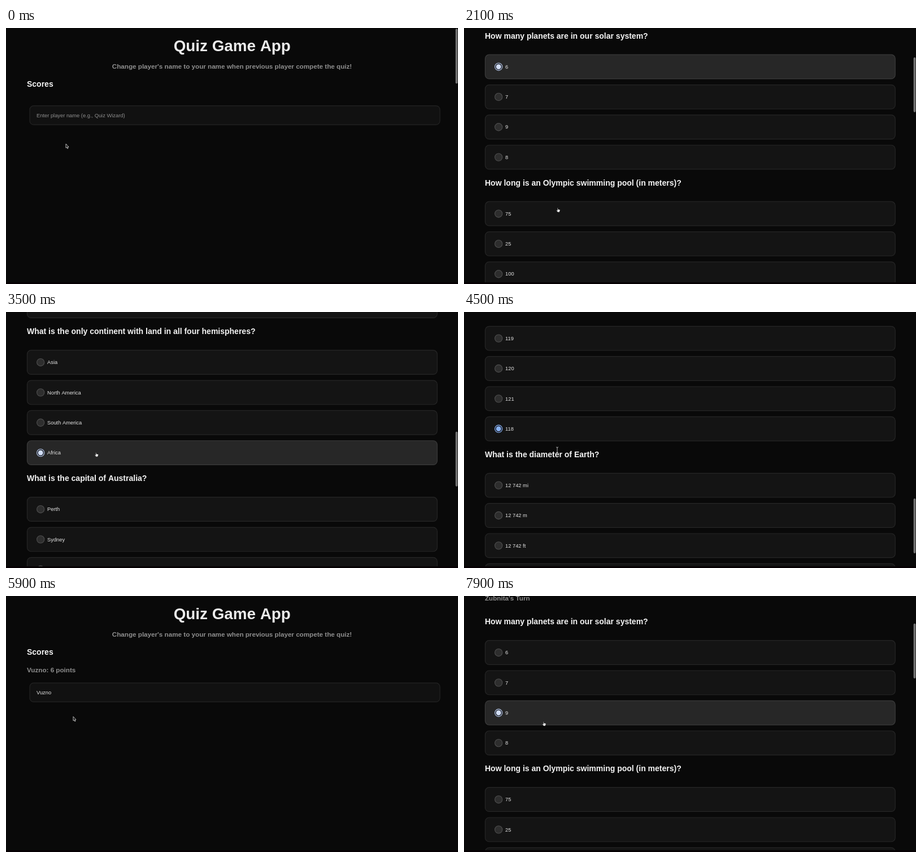
An HTML page with a canvas that plays this animation: 800 px wide and 453 px high, repeating every 8000 ms.

```html
<!DOCTYPE html>
<html lang="en">
<head>
<meta charset="utf-8">
<title>Quiz Game App</title>
<style>
html, body { margin: 0; width: 100%; height: 100%; overflow: hidden; background: #090909; }
canvas { display: block; width: 800px; height: 453px; }
</style>
</head>
<body>
<canvas id="stage"></canvas>
<script>
const W = 800, H = 453, LOOP = 8000, STEP = 100;
const canvas = document.getElementById('stage');
const dpr = window.devicePixelRatio || 1;
canvas.width = W * dpr;
canvas.height = H * dpr;
const ctx = canvas.getContext('2d');

const FONT = '"Liberation Sans", Arial, sans-serif';
const BODY = 9.333, SUB = 11.667, HEAD = 14, TITLE = 27.8;
const BLUE = '#8ab4f8', GREY = '#8e8e8e';
const FIRST = 'Vuzno', SECOND = 'Zubnita';

// page layout
const QUIZ_TOP = 255, BLOCK = 260, FIRST_BOX = 32.9, PITCH = 53.35, BOX = 43.7;
const FIELD_TOP = 137.7, FIELD_H = 33.5, SCORE_LINE = 16.2;
const SUBMIT_TOP = 250.5, SUBMIT_H = 28, MAX_SCROLL = 1677.5;

// moments in ms
const FOCUS = 300, TYPE = 600, START = 1100, SUBMITTED = 5400;
const REFOCUS = 6000, RETYPE = 6500, RESTART = 7200, REPICK = 7800;

const quiz = [
  { title: 'How many planets are in our solar system?', options: ['6', '7', '9', '8'], pick: 0 },
  { title: 'How long is an Olympic swimming pool (in meters)?', options: ['75', '25', '100', '50'], pick: 3 },
  { title: 'What geometric shape is generally used for stop signs?', options: ['Hexagon', 'Triangle', 'Octagon', 'Pentagon'], pick: 2 },
  { title: 'What is the only continent with land in all four hemispheres?', options: ['Asia', 'North America', 'South America', 'Africa'], pick: 3 },
  { title: 'What is the capital of Australia?', options: ['Perth', 'Sydney', 'Melbourne', 'Canberra'], pick: 3 },
  { title: 'How many elements are in the periodic table?', options: ['119', '120', '121', '118'], pick: 3 },
  { title: 'What is the diameter of Earth?', options: ['12 742 mi', '12 742 m', '12 742 ft', '12 742 km'], pick: 3 }
];

const clamp = (v, lo = 0, hi = 1) => Math.min(hi, Math.max(lo, v));
const between = (t, a, b) => t >= a && t < b;
const easeOut = u => 1 - (1 - clamp(u)) ** 2;
const typed = (name, t, start, perChar) =>
  name.slice(0, Math.max(0, Math.floor((t - start) / perChar) + 1));

const secondRound = t => t >= SUBMITTED;
const shiftAt = t => secondRound(t) ? SCORE_LINE : 0;
const quizShown = t => between(t, START, SUBMITTED) || t >= RESTART;

// Each answer is scrolled towards a spot that creeps up the window.
const clickTime = k => 1900 + 500 * k;
const answerY = k => QUIZ_TOP + k * BLOCK + FIRST_BOX + BOX / 2 + quiz[k].pick * PITCH;
const aim = k => 309.7 - 19.6 * k - 0.2 * k * k;
const rest = k => clamp(answerY(k) - aim(k), 0, MAX_SCROLL);

function scrollAt(t) {
  if (secondRound(t)) return 250 * easeOut((t - 7300) / 870);
  let y = rest(0);
  for (let k = 1; k < quiz.length; k++) {
    y += (rest(k) - rest(k - 1)) * easeOut((t - clickTime(k - 1) - 100) / 305);
  }
  return y;
}

// time, x, y
const route = [
  [0, 108, 209], [300, 119, 154], [1000, 119, 154], [1300, 167, 322], [2100, 167, 322],
  [3400, 160, 253], [4500, 165, 244], [5000, 229, 403], [5500, 229, 403],
  [6000, 94, 171], [6400, 34, 170], [6900, 34, 170], [7100, 144, 240], [7900, 142, 226]
];

function mouseAt(t) {
  const i = route.findIndex(p => p[0] > t);
  if (i < 0) return route[route.length - 1].slice(1);
  const [a, b] = [route[i - 1], route[i]];
  const u = (t - a[0]) / (b[0] - a[0]);
  return [1, 2].map(c => a[c] + (b[c] - a[c]) * u);
}

function pointerShape(t, y) {
  if (between(t, TYPE, START) || between(t, RETYPE, 7000)) return 'none';
  const pageY = y + scrollAt(t) - shiftAt(t);
  if (between(pageY, FIELD_TOP, FIELD_TOP + FIELD_H)) return 'beam';
  const local = pageY - QUIZ_TOP;
  if (!quizShown(t) || local < -10) return 'arrow';
  const q = Math.min(quiz.length - 1, Math.floor((local + 10) / BLOCK));
  const inner = local - q * BLOCK;
  if (inner < 10) return 'beam';
  if (between(inner, SUBMIT_TOP, SUBMIT_TOP + SUBMIT_H)) return 'hand';
  const row = (inner - FIRST_BOX) / PITCH;
  return between(row, 0, 4) && row % 1 < BOX / PITCH ? 'hand' : 'arrow';
}

function optionState(t, q, o) {
  const again = secondRound(t);
  if (again ? q !== 0 || o !== 2 : o !== quiz[q].pick) return {};
  const click = again ? REPICK : clickTime(q);
  const spot = again ? 228 : answerY(q) - rest(q);
  const near = Math.abs(mouseAt(t)[1] - spot) < BOX / 2;
  return { checked: t >= click, hover: near && Math.abs(t - click) < 250 };
}

// y is the middle of the capitals
function text(str, x, y, size, color, bold = true, align = 'left') {
  ctx.font = `${bold ? 'bold ' : ''}${size}px ${FONT}`;
  ctx.fillStyle = color;
  ctx.textAlign = align;
  ctx.fillText(str, x, y + size * 0.34);
}

function paint(fill, stroke, line) {
  if (fill) {
    ctx.fillStyle = fill;
    ctx.fill();
  }
  if (stroke) {
    ctx.strokeStyle = stroke;
    ctx.lineWidth = line;
    ctx.stroke();
  }
}

function box(x, y, w, h, r, fill, stroke) {
  ctx.beginPath();
  ctx.roundRect(x, y, w, h, r);
  paint(fill, stroke, 1.17);
}

function disc(x, y, r, fill, stroke) {
  ctx.beginPath();
  ctx.arc(x, y, r, 0, Math.PI * 2);
  paint(fill, stroke, 1.1);
}

function option(label, top, { hover, checked }) {
  const mid = top + BOX / 2;
  box(37.5, top + 0.5, 725.7, BOX - 1, 7, hover ? '#272727' : '#141414', hover ? '#3b3b3b' : '#262626');
  if (checked) {
    disc(61.2, mid, 6.6, hover ? '#2b2f38' : '#1b1f28', hover ? '#b4c5e6' : BLUE);
    disc(61.2, mid, 4.4, hover ? '#d2def8' : BLUE);
  } else {
    disc(61.2, mid, 6.6, '#2e2e2e', '#4e4e4e');
  }
  text(label, 73, mid, BODY, '#e4e4e4', false);
}

function questions(t) {
  const start = QUIZ_TOP + shiftAt(t);
  text(`${secondRound(t) ? SECOND : FIRST}'s Turn`, 37, start - 41, SUB, GREY);
  quiz.forEach(({ title, options }, q) => {
    const y = start + q * BLOCK;
    text(title, 37, y, HEAD, '#f4f4f4');
    options.forEach((label, o) =>
      option(label, y + FIRST_BOX + o * PITCH, optionState(t, q, o)));
  });
  const y = start + (quiz.length - 1) * BLOCK + SUBMIT_TOP;
  box(37, y, 726.7, SUBMIT_H, 4.6, '#5858ec');
  text('Submit', 400, y + SUBMIT_H / 2, BODY, '#f3f3ff', true, 'center');
}

function nameField(t) {
  const top = FIELD_TOP + shiftAt(t), mid = top + FIELD_H / 2;
  box(42, top, 726, FIELD_H, 7, '#111111', '#232323');
  if (between(t, FOCUS, clickTime(0)) || between(t, REFOCUS, REPICK)) {
    box(41.6, top - 0.4, 726.8, FIELD_H + 0.8, 7.4, null, BLUE);
  }
  const value = t < RETYPE ? typed(FIRST, t, TYPE, 80) : typed(SECOND, t, RETYPE, 50);
  if (!value) return text('Enter player name (e.g., Quiz Wizard)', 54, mid, BODY, GREY, false);
  if (between(t, REFOCUS, RETYPE)) {
    ctx.font = `${BODY}px ${FONT}`;
    const end = 54 + ctx.measureText(value).width;
    const from = clamp(mouseAt(t)[0], 54, end);
    ctx.fillStyle = '#315a92';
    ctx.fillRect(from, mid - 5.5, end - from, 11);
  }
  text(value, 54, mid, BODY, '#e4e4e4', false);
}

const pointers = {
  arrow: ['M-2-4V3.2L-.5 1.9 .8 4.5 1.9 4 .8 1.5H3Z', '#080808', '#cfcfcf', 0.9],
  beam: ['M-2-5Q0-5 0-3.5Q0-5 2-5M0-4V4M-2 5Q0 5 0 3.5Q0 5 2 5', null, '#a8a8a8', 1],
  hand: ['M-1.8-4H-.8L-.5-1.2 2.4-.7 3.2.2 2 4H-1.2L-3.6.8-3 .1-1.8 1Z', '#eeeeee', '#050505', 0.6]
};

function pointer(t) {
  const [x, y] = mouseAt(t);
  const look = pointers[pointerShape(t, y)];
  if (!look) return;
  const [d, fill, stroke, line] = look;
  const path = new Path2D(d);
  ctx.save();
  ctx.translate(x, y);
  if (fill) {
    ctx.fillStyle = fill;
    ctx.fill(path);
  }
  ctx.strokeStyle = stroke;
  ctx.lineWidth = line;
  ctx.stroke(path);
  ctx.restore();
}

function scrollbar(t, scroll) {
  const alpha = secondRound(t) ? 1 : clamp((4950 - t) / 150);
  if (!scroll || !alpha) return;
  ctx.globalAlpha = alpha;
  box(795.6, 1.3 + scroll * 0.2103, 3.8, 97, 1.9, '#737373');
  ctx.globalAlpha = 1;
}

function draw(t) {
  const scroll = scrollAt(t);
  ctx.setTransform(dpr, 0, 0, dpr, 0, 0);
  ctx.fillStyle = '#090909';
  ctx.fillRect(0, 0, W, H);

  ctx.save();
  ctx.translate(0, -scroll);
  text('Quiz Game App', 400.2, 31.7, TITLE, '#ebebeb', true, 'center');
  text("Change player's name to your name when previous player compete the quiz!",
    400, 68.2, SUB, GREY, true, 'center');
  text('Scores', 37, 99.5, HEAD, '#f4f4f4');
  if (secondRound(t)) text(`${FIRST}: 6 points`, 37, 131.2, SUB, GREY);
  nameField(t);
  if (quizShown(t)) questions(t);
  ctx.restore();

  scrollbar(t, scroll);
  ctx.fillStyle = '#060103';
  ctx.fillRect(0, 450, W, 3);
  pointer(t);
}

const origin = performance.now();
function tick() {
  const t = (performance.now() - origin) % LOOP;
  draw(Math.floor(t / STEP) * STEP);
  requestAnimationFrame(tick);
}
tick();
</script>
</body>
</html>
```
